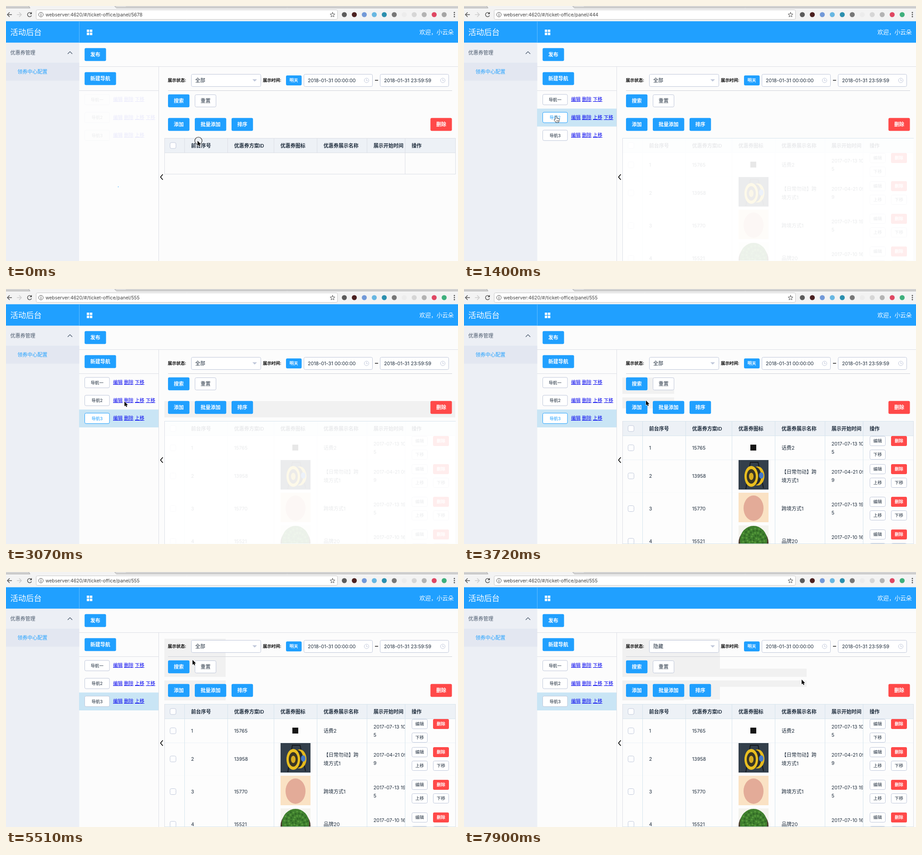
Recreate the animation shown at these times as an HTML page with a canvas. Size 996 by 562 pixels, loop 8000 ms.

```html
<!DOCTYPE html>
<html lang="zh">
<head>
<meta charset="utf-8">
<style>
html, body { margin: 0; width: 100%; height: 100%; overflow: hidden; background: #fcfcfc; }
canvas { display: block; }
</style>
</head>
<body>
<canvas id="stage" width="996" height="562"></canvas>
<script>
const ctx = document.getElementById('stage').getContext('2d');
const LOOP = 8000;
const FONT = 'Inter, "Noto Sans CJK SC", "Noto Sans CJK", sans-serif';
const BLUE = '#20a0ff', RED = '#ff4949', INK = '#1f2d3d', EDGE = '#bfc7da', LINE = '#dcdfe6', GRID = '#d6e4ed';

const HOLDS = [0, 240, 710, 1010, 1205, 1400, 1690, 1960, 2230, 2590, 2860, 3070];
const STEADY = 3400, STEP = 150;
const refresh = t => t < STEADY
  ? HOLDS.filter(h => h <= t).pop()
  : STEADY + Math.floor((t - STEADY) / STEP) * STEP;

// Pointer strokes: start, end, destination.
const MOVES = [
  [100, 710, 208, 231], [710, 1010, 203, 243], [1690, 1960, 202, 293], [2400, 3070, 261, 248],
  [3400, 3850, 450, 245], [3850, 4300, 295, 247], [5050, 5800, 474, 165],
  [6100, 6550, 496, 203], [6550, 7000, 490, 228], [7300, 7900, 744, 237]
];
const CLICKS = [0, 1010, 4750, 6100, 7300];

const between = (t, a, b) => t >= a && t < b;
const ramp = (t, a, b) => Math.max(0, Math.min(1, (t - a) / (b - a)));
const ease = k => k * k * (3 - 2 * k);
const pulse = (t, a, b, c, d) => Math.min(ramp(t, a, b), 1 - ramp(t, c, d));

function pointerAt(t) {
  return MOVES.reduce(([x, y], [a, b, toX, toY]) => {
    const k = ease(ramp(t, a, b));
    return [x + (toX - x) * k, y + (toY - y) * k];
  }, [422, 297]);
}
const menuScale = t => pulse(t, 6330, 6630, 7300, 7600);
const tableVeil = t => .9 * (pulse(t, 0, 240, 700, 710) + pulse(t, 1010, 1400, 1690, 2050) + pulse(t, 2590, 3070, 3400, 3700));
const navVeil = t => .92 * (1 - ramp(t, 200, 240) + pulse(t, 4770, 5060, 5220, 5500));

function rect(x, y, w, h, fill) { ctx.fillStyle = fill; ctx.fillRect(x, y, w, h); }
function disc(x, y, r, fill, ry = r) {
  ctx.fillStyle = fill;
  ctx.beginPath(); ctx.ellipse(x, y, r, ry, 0, 0, 7); ctx.fill();
}
function ring(x, y, r, color, width = 1, a = 0, b = 2 * Math.PI) {
  ctx.strokeStyle = color; ctx.lineWidth = width;
  ctx.beginPath(); ctx.arc(x, y, r, a, b); ctx.stroke();
}
function path(points, color, width) {
  ctx.beginPath();
  points.forEach(([x, y]) => ctx.lineTo(x, y));
  if (width) { ctx.strokeStyle = color; ctx.lineWidth = width; ctx.stroke(); }
  else { ctx.fillStyle = color; ctx.fill(); }
}
function box(x, y, w, h, fill, stroke) {
  const o = stroke ? .5 : 0;
  ctx.beginPath(); ctx.roundRect(x + o, y + o, w - 2 * o, h - 2 * o, 3);
  ctx.fillStyle = fill; ctx.fill();
  if (stroke) { ctx.strokeStyle = stroke; ctx.lineWidth = 1; ctx.stroke(); }
}
function clipped(x, y, w, h, paint) {
  ctx.save();
  ctx.beginPath(); ctx.rect(x, y, w, h); ctx.clip();
  paint();
  ctx.restore();
}
function text(s, x, cy, size = 11, color = INK, weight = 400, align = 'left') {
  ctx.font = `${weight} ${size}px ${FONT}`;
  ctx.textAlign = align; ctx.fillStyle = color;
  ctx.fillText(s, x, cy + size * .37);
}
function button(s, x, y, fill = BLUE) {
  const w = 25.2 + 11.03 * s.length;
  box(x, y, w, 28.4, fill);
  text(s, x + w / 2, y + 14.2, 11, '#fff', 600, 'center');
}
function smallButton(s, x, y, w = 35, fill = RED) {
  box(x, y, w, 22, fill);
  text(s, x + w / 2, y + 11, 9.4, '#fff', 600, 'center');
}
function plainButton(s, x, y, w, h, size = 9.4, color = INK, edge = EDGE) {
  box(x, y, w, h, '#fff', edge);
  text(s, x + w / 2, y + h / 2, size, color, 400, 'center');
}

function browser(t) {
  rect(0, 0, 996, 34, '#f3f3f3');
  rect(0, 0, 996, 4, '#d2d2d2');
  path([[50, 0], [54, 4.5], [243, 4.5], [239, 0]], '#f3f3f3');
  path([[0, 4.5], [53, 4.5], [50, 0]], '#a9a9a9', 1);
  path([[239, 0], [243, 4.5], [996, 4.5]], '#b5b5b5', 1);
  rect(243, 0, 21, 2, '#dedede');
  [[3, 5, '#555'], [34, -5, '#ccc']].forEach(([tip, d, color]) => {
    path([[tip + 2 * d, 19], [tip, 19]], color, 1.5);
    path([[tip + d, 14], [tip, 19], [tip + d, 24]], color, 1.5);
  });
  ring(52, 19, 4.6, '#555', 1.5, .4, 5.5);
  path([[57, 13], [57, 18], [52, 18]], '#555');
  box(66, 8, 665, 22, '#fff', '#c9c9c9');
  ring(77, 19, 5, '#555');
  rect(76.4, 18, 1.3, 4, '#555'); rect(76.4, 15.8, 1.3, 1.3, '#555');
  const id = t < 1010 ? '5678' : t < 2590 ? '444' : '555';
  text('webserver:4620/#/ticket-office/panel/' + id, 87, 19, 10.4, '#444');
  const star = Array.from({ length: 12 }, (_, i) => {
    const a = i * Math.PI / 5 - Math.PI / 2, r = i % 2 ? 2.4 : 5.6;
    return [719.5 + r * Math.cos(a), 19.5 + r * Math.sin(a)];
  });
  path(star, '#555', 1);
  const badges = ['#5c5c5c', '#4b2020', '#7299d8', '#68b7e2', '#2b8fae', '#777', '#ececec', '#d6d6d6',
    '#b3b3b3', '#df4763', t < 710 ? '#a5a5a5' : '#3eaf7c'];
  badges.forEach((color, i) => disc(745.5 + 22 * i, 19, 5.5, color));
  [14.5, 19, 23.5].forEach(y => disc(988, y, 1.4, '#555'));
}

function shell() {
  rect(0, 33.6, 996, 47.25, BLUE);
  rect(161, 33.6, 1, 47.25, '#62bcff');
  text('活动后台', 9.5, 57.5, 17.3, '#fff');
  for (const x of [178, 184.8]) for (const y of [52, 58.8]) rect(x, y, 5.4, 5.4, '#fff');
  text('欢迎，小云朵', 986.5, 57.5, 12.6, '#fff', 400, 'right');
  rect(0, 80.85, 161.4, 482, '#eceff5');
  rect(0, 125, 161.4, 39.5, '#e3e7f1');
  text('优惠券管理', 9.5, 103, 11, '#48576a');
  path([[136, 105.5], [141, 100.5], [146, 105.5]], '#48576a', 1.2);
  text('领券中心配置', 25.2, 145, 11, BLUE);
  rect(161, 133, 835, 1, LINE);
  rect(336, 133, 1, 429, LINE);
  rect(161, 186, 176, 1, LINE);
  button('发布', 173.2, 92.8);
  button('新建导航', 173.2, 145.8);
  path([[345.5, 371], [340.5, 377], [345.5, 383]], '#000', 1.6);
}

function nav(t) {
  const chosen = t < 710 ? -1 : t < 1010 ? 0 : t < 2590 ? 1 : 2;
  const rows = [['导航一', '编辑 删除 下移'], ['导航2', '编辑 删除 上移 下移'], ['导航3', '编辑 删除 上移']];
  rows.forEach(([name, links], i) => {
    const y = 206.3 + i * 39.4;
    if (i === chosen) rect(161, y - 19.5, 175, 39.4, i ? '#c9e5f5' : '#d2e5f0');
    const focused = i === chosen && i && t < 4750;
    const hovered = i === 2 && between(t, 1960, 2590);
    const tint = focused || hovered ? BLUE : null;
    plainButton(name, 173, y - 12, 55.5, 24, 9.4, tint || INK, tint || EDGE);
    links.split(' ').forEach((s, k) => {
      const x = 236 + 24 * k;
      text(s, x, y - .9, 10.4, '#0000ee');
      rect(x, Math.round(y + 4), 20.8, 1, '#0000ee');
    });
  });
  const veil = navVeil(t);
  if (!veil) return;
  rect(161, 187, 175, 375, `rgba(253,253,253,${veil})`);
  const start = Math.PI / 2 + t / 320;
  ring(248, 383, 15.5, BLUE, 1.5, start, start + .08 + 4.5 * Math.sin(t / 480) ** 2);
}

// The grey bands behind the buttons show only where the page was repainted.
function bands(t) {
  const reveal = (right, top, bottom, left = 349) => clipped(left, top, right - left, bottom - top, () => {
    rect(349, 147, 641, 84, '#f1f1f1');
    rect(349, 239, 641, 44, '#f1f1f1');
  });
  if (between(t, 1690, 2860)) reveal(990, 266, 273);
  if (between(t, 2860, 3400)) reveal(990, 247, 283);
  if (between(t, 3700, 5500)) reveal(463, 195, 263);
  if (t >= 5500) reveal(484, 147, 283);
  if (t >= 6400) reveal(564, 147, 183 + 98 * ramp(t, 6330, 6630));
  if (t >= 7600) reveal(pointerAt(t)[0] + 11, 213, 253, 564);
}

function dateField(s, x) {
  box(x, 150, 152, 28, '#fff', EDGE);
  text(s, x + 9, 164, 10.7);
  ring(x + 138.5, 164, 5, EDGE);
  path([[x + 138.5, 161], [x + 138.5, 164.5], [x + 141, 164.5]], EDGE, 1);
}

function filters(t) {
  bands(t);
  text('展示状态:', 356.5, 163.5, 9.4, '#000', 600);
  box(408, 150, 154, 28, '#fff', between(t, 5800, 7600) ? BLUE : EDGE);
  text(t < 7300 ? '全部' : '隐藏', 417, 164);
  const d = between(t, 6400, 7450) ? -2.5 : 2.5;
  path([[543, 164 - d], [553, 164 - d], [548, 164 + d]], EDGE);
  text('展示时间:', 566, 163.5, 9.4, '#000', 600);
  smallButton('明天', 617, 153, 34.5, BLUE);
  dateField('2018-01-31 00:00:00', 656);
  rect(813, 163, 7, 1.3, '#000');
  dateField('2018-01-31 23:59:59', 824);
  rect(357, 186, 626, 1, '#cfd2d8');
  button('搜索', 357, 194.8);
  plainButton('重置', 416, 195, 47.3, 28, 11);
  button('添加', 357, 246.8);
  button('批量添加', 416, 246.8);
  button('排序', 497, 246.8);
  button('删除', 935.3, 246.8, RED);
}

// Thumbnails, drawn from their top left corner.
const PICTURES = [
  () => rect(26, -6, 13, 13, '#151515'),
  () => {
    rect(0, 0, 66, 65, '#333f4b');
    path([[16, 64], [26, 5], [43, 5], [55, 62]], '#15191e', 2);
    disc(42, 35, 15, '#e5b91c', 21);
    disc(36, 35, 14, '#292d2e', 20);
    disc(28, 36, 15, '#e9bf20', 23);
    disc(28, 36, 10, '#3a3624', 16);
    disc(28, 36, 5, '#d8ad20', 8);
    disc(50, 34, 5, '#4379ce', 7);
  },
  () => { rect(0, 0, 66, 65, '#fae2c4'); disc(33, 34, 22, '#e3ab98', 28); },
  () => {
    rect(0, 0, 66, 65, '#f4f3ee');
    disc(33, 38, 33, '#4a3a2c', 32);
    disc(33, 33, 30, '#3f7f2e', 32);
    for (let i = 0; i < 70; i++) {
      const a = i * 2.4, r = Math.sqrt(i / 70);
      disc(33 + 27 * r * Math.cos(a), 33 + 29 * r * Math.sin(a), 2, i % 2 ? '#559a3b' : '#2f6824');
    }
  }
];

const ROWS = [
  ['15765', ['话费2'], '2017-07-13 10', '5'],
  ['13958', ['【日常勿动】跨', '境方式1'], '2017-04-21 09', '9'],
  ['15770', ['跨境方式1'], '2017-07-13 19', '5'],
  ['15521', ['品牌20'], '2017-07-10 16', '8']
];
const COLUMNS = [393, 488, 590, 685, 795, 879];
const HEADS = ['前台序号', '优惠券方案ID', '优惠券图标', '优惠券展示名称', '展示开始时间', '操作'];
const [orderX, idX, pictureX, nameX, dateX, actionX] = COLUMNS.map(x => x + 14.7);

const checkbox = cy => box(361, cy - 7, 14, 14, '#fff', EDGE);

function tableRow([id, name, date, rest], i) {
  const h = i ? 71.7 : 53, y = i ? 304.7 + 71.7 * i : 323;
  const cy = Math.round(y + h / 2);
  rect(350, y, 640, h, '#fdfdfd');
  checkbox(cy);
  text(i + 1, orderX, cy, 10.7);
  text(id, idX, cy, 10.7);
  ctx.save();
  ctx.translate(605, i ? Math.round(y) + 1 : cy - 1);
  PICTURES[i]();
  ctx.restore();
  name.forEach((s, k) => text(s, nameX, cy + (k - (name.length - 1) / 2) * 19));
  clipped(796, y, 84, h, () => {
    text(date, dateX, cy - 9, 10.7);
    text(rest, dateX, cy + 9.5, 10.7);
  });
  plainButton('编辑', 894, cy - 26, 35, 22);
  smallButton('删除', 941, cy - 26);
  (i ? ['上移', '下移'] : ['下移']).forEach((s, k) => plainButton(s, 894 + 47 * k, cy + 4, 35, 22));
  rect(349, Math.round(y + h), 641, 1, GRID);
}

function table(t) {
  const empty = t < 710, bottom = empty ? 371 : 562, rule = empty ? LINE : GRID;
  rect(349, 291, 641, 32, '#edf1f6');
  checkbox(307.5);
  HEADS.forEach((s, i) => text(s, COLUMNS[i] + 14.7, 307.5, 11, INK, 600));
  if (!empty) ROWS.forEach(tableRow);
  [291, 323, bottom - 1].forEach(y => rect(349, y, 641, 1, rule));
  COLUMNS.forEach((x, i) => rect(x, 291, 1, (empty && i < 5 ? 323 : bottom) - 291, rule));
  [349, 990].forEach(x => rect(x, 291, 1, bottom - 291, LINE));
  rect(350, 292, 641, bottom - 292, `rgba(255,255,255,${tableVeil(t)})`);
}

function menu(t) {
  const scale = menuScale(t);
  if (!scale) return;
  ctx.save();
  ctx.globalAlpha = Math.min(1, scale * 1.1);
  ctx.translate(0, 182.5);
  ctx.scale(1, scale);
  rect(408, 1, 155, 96, 'rgba(0,0,0,.12)');
  box(408, 0, 154, 94, '#fff', '#d1dbe5');
  const chosen = t < 7300 ? 0 : 1, hovered = t >= 6850 ? 1 : 0;
  ['全部', '隐藏', '展示'].forEach((s, i) => {
    const y = 4.7 + 28.2 * i;
    if (i === chosen) rect(409, y, 152, 28.2, BLUE);
    else if (i === hovered) rect(409, y, 152, 28.2, '#e4e8f1');
    text(s, 417, y + 14.2, 11, i === chosen ? '#fff' : '#48576a');
  });
  ctx.restore();
}

const ARROW = new Path2D('M0 0V10.6L2.4 8.4 4 12 5.9 11.2 4.3 7.7H7.6Z');
const HAND = new Path2D('M-1.4 6.5V1a1.2 1.2 0 0 1 2.4 0V4.4L5.6 5.5Q7 6 6.8 7.6L6.2 10.6 5.2 13.6H0L-3.8 8.4Q-4 6.6-2.5 7Z');

function pointer(t) {
  const [x, y] = pointerAt(t);
  const hand = between(t, 1010, 2860) || between(t, 4300, 5060) || between(t, 5650, 7450);
  if (CLICKS.some(c => between(t, c, c + STEP))) ring(x + 2, y, 8, '#222', 1.1);
  ctx.save();
  ctx.translate(x, y);
  ctx.lineJoin = 'round';
  ctx.strokeStyle = hand ? '#000' : '#fff';
  ctx.fillStyle = hand ? '#fff' : '#000';
  ctx.lineWidth = 1.4;
  ctx.stroke(hand ? HAND : ARROW);
  ctx.fill(hand ? HAND : ARROW);
  if (hand) [1.2, 3, 4.8].forEach(k => path([[k, 9], [k, 11.5]], '#000', .7));
  ctx.restore();
}

function draw(now) {
  const t = refresh(now % LOOP);
  rect(0, 0, 996, 562, '#fcfcfc');
  [browser, shell, nav, filters, table, menu, pointer].forEach(part => part(t));
}

const began = performance.now();
function loop() {
  draw(performance.now() - began);
  requestAnimationFrame(loop);
}
loop();
</script>
</body>
</html>
```
